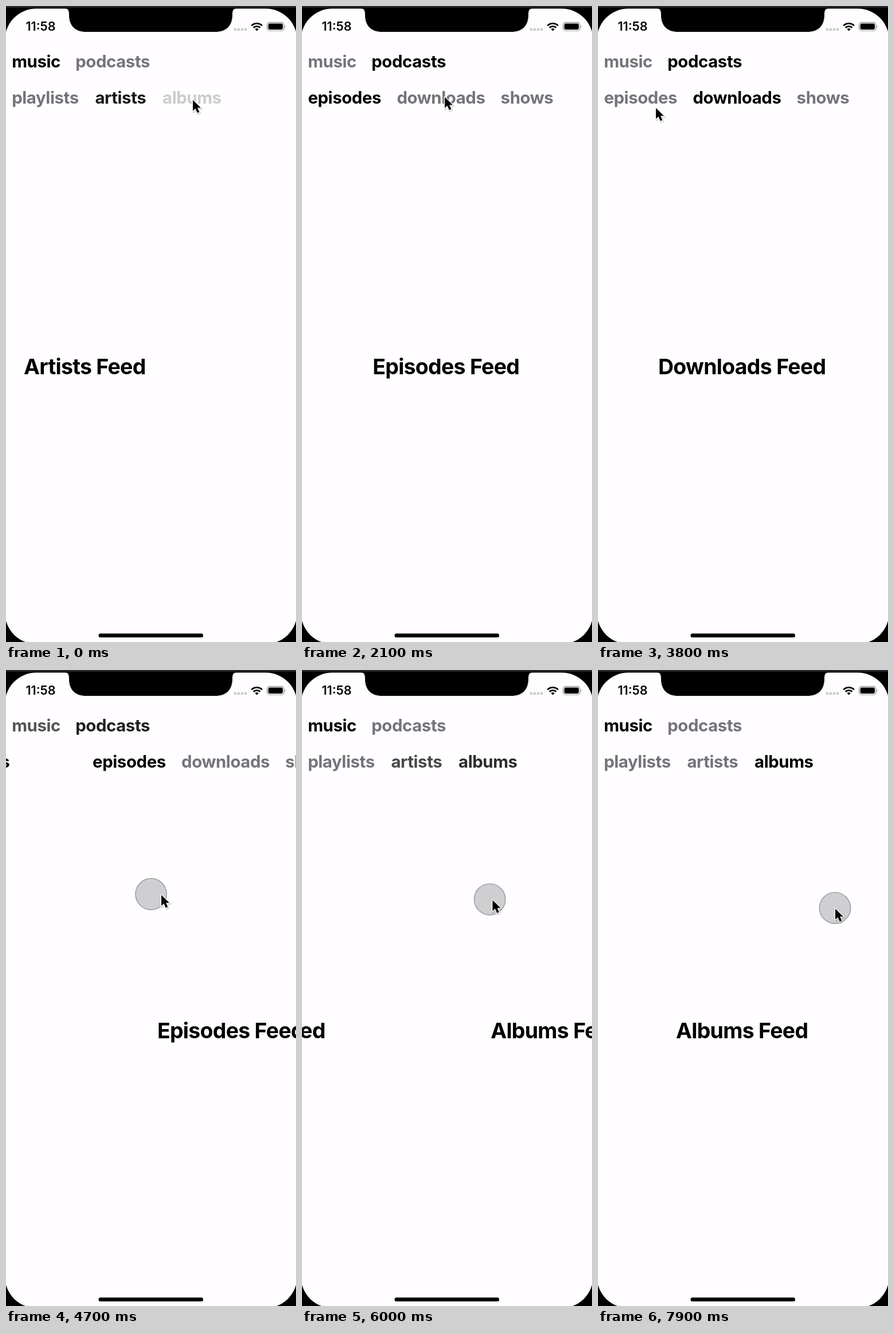
An HTML page that plays this animation: 506 by 1107 pixels, repeating every 8 s.

```html
<!DOCTYPE html>
<html lang="en">
<head>
<meta charset="utf-8">
<title>Nested pager</title>
<style>
  html, body { margin: 0; width: 100%; height: 100%; overflow: hidden; background: #000; }
  svg { display: block; width: 100%; height: 100%; }
  text { font-family: Inter, "Liberation Sans", sans-serif; font-weight: 700; }
  .clock { font-size: 21.6px; font-weight: 600; }
  .tab { font-size: 29.4px; letter-spacing: -0.014em; }
  .feed { font-size: 37.5px; letter-spacing: -0.02em; text-anchor: middle; }
</style>
</head>
<body>
<svg id="stage" viewBox="0 0 506 1107">
  <defs>
    <clipPath id="screen"><rect x="-2" y="4.5" width="510" height="1106" rx="55"/></clipPath>
    <path id="arrow" d="M0 0V19.2L4.4 15 7.8 22.6 11.4 21 8.2 13.8H14Z" stroke-linejoin="round"/>
  </defs>
  <rect width="506" height="1107"/>
  <rect width="506" height="3" fill="#242327"/>
  <g clip-path="url(#screen)">
    <rect width="506" height="1107" fill="#fffdff"/>
    <g id="tabs"></g>
    <g id="music"></g>
    <g id="podcasts"></g>
  </g>
  <path d="M102 4q8 0 8 9v2c0 20 11 30 30 30h225c19 0 30-10 30-30v-2q0-9 8-9z"/>
  <text class="clock" x="34.4" y="43">11:58</text>
  <g fill="#cbc9cc">
    <circle cx="399.7" cy="41" r="2.4"/><circle cx="405.8" cy="41" r="2.4"/>
    <circle cx="411.9" cy="41" r="2.4"/><circle cx="418" cy="41" r="2.4"/>
  </g>
  <g fill="none" stroke="#000" stroke-width="2.8">
    <path d="M428.3 34.2a13.2 13.2 0 0 1 18.6 0"/>
    <path d="M431.7 37.8a8.4 8.4 0 0 1 11.8 0"/>
  </g>
  <path d="M437.6 43.6l-3.2-3.3a4.6 4.6 0 0 1 6.4 0z"/>
  <rect x="455.6" y="28.6" width="29.4" height="14.4" rx="4.2" fill="none" stroke="#8e8c90" stroke-width="1.2"/>
  <rect x="457.6" y="30.6" width="25.4" height="10.4" rx="2.4"/>
  <path d="M486.4 33.4q2.2 2.4 0 4.8z" fill="#8e8c90"/>
  <rect x="161.5" y="1092.3" width="182.5" height="6.8" rx="3.4"/>
  <circle id="touch" r="27.2" fill="rgba(130,128,134,.38)" stroke="#8f8d91" stroke-width="1.2"/>
  <g id="cursor">
    <use href="#arrow" x="2" y="4" fill="none" stroke="#000" stroke-opacity=".14" stroke-width="4"/>
    <use href="#arrow" x="1" y="2.4" stroke="#fff" stroke-width="2.6" paint-order="stroke"/>
  </g>
</svg>
<script>
const LOOP = 8000, STEP = 100, PAGE = 510, SETTLE = 284, TOUCH_LAG = 14;
const GREY = [118, 116, 120];
const $ = id => document.getElementById(id);
const clamp = p => Math.max(0, Math.min(1, p));
const easeInOut = p => (1 - Math.cos(Math.PI * clamp(p))) / 2;
const easeOut = p => Math.sin(Math.PI / 2 * clamp(p));

function addText(parent, cls, x, y, str) {
  const el = document.createElementNS("http://www.w3.org/2000/svg", "text");
  el.setAttribute("class", cls);
  el.setAttribute("x", x);
  el.setAttribute("y", y);
  el.textContent = str;
  parent.appendChild(el);
  return el;
}

const addTabs = (parent, y, items) =>
  Object.entries(items).map(([name, x]) => addText(parent, "tab", x, y, name));

function makeGroup(el, items) {
  const feeds = Object.keys(items).map(name =>
    addText(el, "feed", 0, 641, name[0].toUpperCase() + name.slice(1) + " Feed"));
  return { el, feeds, tabs: addTabs(el, 170, items), start: 0 };
}

const outer = { tabs: addTabs($("tabs"), 107, { music: 10.2, podcasts: 121.2 }), start: 0 };
const music = makeGroup($("music"), { playlists: 10.2, artists: 155.4, albums: 273 });
const podcasts = makeGroup($("podcasts"), { episodes: 10.4, downloads: 165.4, shows: 346.6 });
music.start = 1;

// A tap releases at once; a drag follows the finger until release
const tap = (pager, at, to) => ({ pager, at, until: at, to, tab: pager.tabs[to] });
const drag = (pager, at, until, to) => ({ pager, at, until, to });
const moves = [
  tap(music, -89, 2),
  tap(outer, 1511, 1),
  tap(podcasts, 2711, 2),
  tap(podcasts, 3311, 1),
  tap(podcasts, 3911, 0),
  drag(outer, 4500, 4800, 0),
  drag(music, 5600, 6100, 1),
  drag(music, 6900, 7200, 2),
  drag(music, 7900, 8000, 2)
];

// Pointer trips: depart, arrive, x, y
const trips = [
  [0, 0, 325, 161], [200, 900, 411, 368], [950, 1300, 214, 111], [1700, 2100, 248, 156],
  [2400, 2600, 411, 157], [3000, 3300, 240, 165], [3550, 3800, 100, 175],
  [4100, 4500, 112, 388], [4500, 4900, 428, 390], [5000, 5500, 134, 398],
  [5600, 6060, 340, 398], [6100, 6450, 430, 398], [6450, 6800, 335, 391],
  [6900, 7300, 60, 398], [7300, 7850, 413, 413]
];

function pointer(t) {
  let [, , x, y] = trips[0];
  for (const [depart, arrive, tx, ty] of trips.slice(1)) {
    const p = easeInOut((t - depart) / (arrive - depart));
    x += (tx - x) * p;
    y += (ty - y) * p;
  }
  return [x, y];
}

const touchPoint = t => pointer(t - TOUCH_LAG);

function position(pager, t) {
  let pos = pager.start;
  for (const { at, until, to, tab } of moves.filter(m => m.pager === pager && m.at <= t)) {
    pos += (touchPoint(at)[0] - touchPoint(Math.min(t, until))[0]) / PAGE;
    const ease = tab ? easeInOut : easeOut;
    pos += (to - pos) * ease((t - until) / SETTLE);
  }
  return pos;
}

function paintTabs(tabs, pos) {
  tabs.forEach((el, i) => {
    const k = clamp(Math.abs(i - pos));
    el.setAttribute("fill", `rgb(${GREY.map(c => Math.round(c * k))})`);
  });
}

function paintGroup(group, x, pos) {
  group.el.setAttribute("transform", `translate(${x} 0)`);
  paintTabs(group.tabs, pos);
  group.feeds.forEach((el, i) => el.setAttribute("x", 251.2 + PAGE * (i - pos)));
}

function draw(t) {
  const page = position(outer, t);
  paintTabs(outer.tabs, page);
  paintGroup(music, -PAGE * page, position(music, t));
  paintGroup(podcasts, PAGE * (1 - page), position(podcasts, t));

  for (const { tab, at } of moves.filter(m => m.tab)) {
    const fade = .2 + .8 * clamp((t - at) / 250) ** 2;
    tab.setAttribute("opacity", t > at ? fade : 1);
  }

  const [x, y] = pointer(t), [tx, ty] = touchPoint(t);
  const down = moves.some(m => t >= m.at && t < m.until);
  $("cursor").setAttribute("transform", `translate(${x} ${y})`);
  $("touch").setAttribute("transform", `translate(${tx + .5} ${ty + 1.2})`);
  $("touch").setAttribute("visibility", down ? "visible" : "hidden");
}

const start = performance.now();
function tick() {
  const t = (performance.now() - start) % LOOP;
  draw(Math.floor(t / STEP) * STEP);
  requestAnimationFrame(tick);
}
tick();
</script>
</body>
</html>
```
